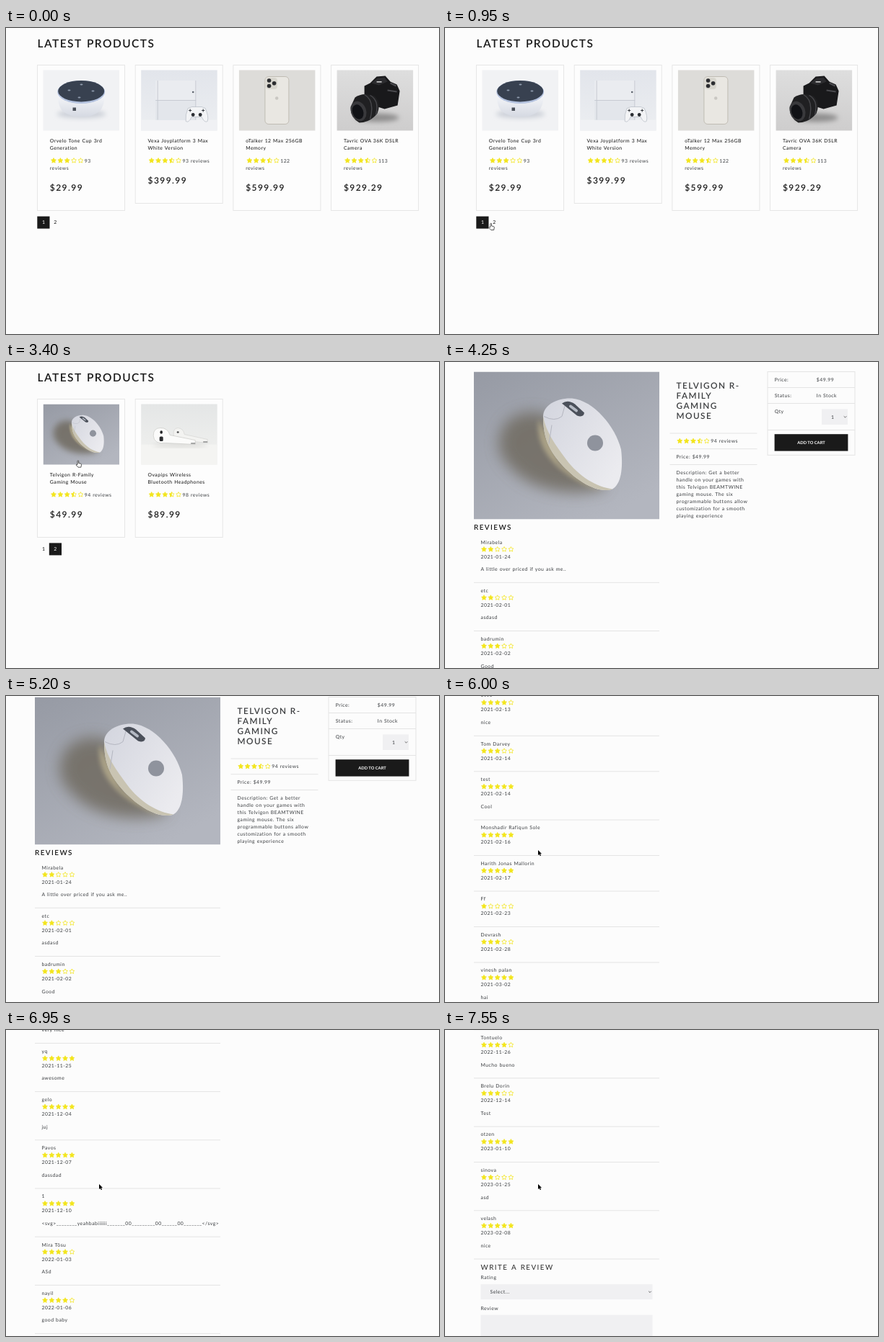
Recreate the animation shown at these times as an HTML page. Size 600 px wide and 425 px high, loop 8 s.

```html
<!DOCTYPE html>
<html lang="en">
<head>
<meta charset="utf-8">
<title>Latest products</title>
<style>
html, body { margin: 0; width: 100%; height: 100%; overflow: hidden; background: #fcfcfc; }
svg { display: block; width: 100vw; height: 100vh; }
text { font-family: Lato, "Open Sans", sans-serif; text-rendering: geometricPrecision; }
.body { font-size: 6.85px; letter-spacing: .476px; word-spacing: .35px; fill: #3a3d40; }
.link { fill: #111; }
.title { font-size: 15.5px; font-weight: 600; letter-spacing: 1.45px; word-spacing: 1.5px; fill: #1a1a1a; }
.price { font-size: 12px; font-weight: 600; letter-spacing: 1.43px; fill: #1a1a1a; }
.name { font-size: 11.8px; font-weight: 600; letter-spacing: 1.43px; fill: #3c3e40; }
.head { font-size: 9.9px; letter-spacing: 1.43px; word-spacing: 1px; fill: #2a2a2a; }
.strong { font-weight: 600; fill: #1a1a1a; }
.button { font-size: 5.8px; font-weight: 700; fill: #fff; text-anchor: middle; }
.pager { letter-spacing: 0; text-anchor: middle; }
.white { fill: #fff; }
.rule { stroke: #e4e4e4; fill: none; }
.chevron { fill: none; stroke: #444; stroke-width: .8; }
</style>
</head>
<body>
<svg id="stage" viewBox="0 0 600 425" preserveAspectRatio="none"></svg>
<script>
const LOOP = 8000, STEP = 50;

const esc = s => s.replace(/&/g, '&amp;').replace(/</g, '&lt;').replace(/>/g, '&gt;');
const text = (x, y, s, cls = 'body') => `<text x="${x}" y="${y}" class="${cls}">${esc(s)}</text>`;
const lines = (x, y, gap, list, cls) => list.map((s, i) => text(x, y + i * gap, s, cls)).join('');
const rect = (x, y, w, h, fill, more = '') => `<rect x="${x}" y="${y}" width="${w}" height="${h}" fill="${fill}" ${more}/>`;
const oval = (x, y, rx, ry, fill, more = '') => `<ellipse cx="${x}" cy="${y}" rx="${rx}" ry="${ry}" fill="${fill}" ${more}/>`;
const path = (d, fill, more = '') => `<path d="${d}" fill="${fill}" ${more}/>`;
const rule = (x1, x2, y) => `<path class="rule" d="M${x1} ${y}H${x2}"/>`;
const chevron = (x, y) => `<path class="chevron" d="M${x - 1.8} ${y - .9}l1.8 1.8l1.8 -1.8"/>`;
const group = (id, s) => `<g id="${id}">${s}</g>`;

// Stars
const starShape = r => 'M' + Array.from({ length: 10 }, (_, i) => {
  const a = (i / 5 - .5) * Math.PI, k = i % 2 ? r * .5 : r;
  return `${(k * Math.cos(a)).toFixed(2)} ${(k * Math.sin(a)).toFixed(2)}`;
}).join('L') + 'Z';

function stars(x, y, rating) {
  return Array.from({ length: 5 }, (_, i) => {
    const kind = rating >= i + 1 ? 'full' : rating > i ? 'half' : 'empty';
    return `<use href="#${kind}" x="${(x + i * 9.35).toFixed(2)}" y="${y}"/>`;
  }).join('');
}

const gradient = (id, a, b, dir = 'x2="0" y2="1"') =>
  `<linearGradient id="${id}" x1="0" y1="0" ${dir}><stop stop-color="${a}"/><stop offset="1" stop-color="${b}"/></linearGradient>`;

const defs = `<defs>
  <g id="empty">${path(starShape(3.6), 'none', 'stroke="#f3e51c" stroke-width=".8" stroke-linejoin="round"')}</g>
  <g id="full">${path(starShape(3.7), '#f3e51c', 'stroke="#f3e51c" stroke-width=".7" stroke-linejoin="round"')}</g>
  <clipPath id="left"><rect x="-5" y="-5" width="5" height="10"/></clipPath>
  <g id="half"><use href="#empty"/><g clip-path="url(#left)"><use href="#full"/></g></g>
  <clipPath id="photo"><rect width="257" height="205"/></clipPath>
  <filter id="soft" x="-40%" y="-40%" width="180%" height="180%"><feGaussianBlur stdDeviation="10"/></filter>
  <filter id="haze" x="-40%" y="-40%" width="180%" height="180%"><feGaussianBlur stdDeviation="3"/></filter>
  ${gradient('desk', '#969aa4', '#b3b6bf', 'x2=".7" y2="1"')}
  ${gradient('shell', '#d3d5de', '#ebebef', 'x2="1" y2=".7"')}
  ${gradient('grey', '#dedede', '#cecdcd')}
  ${gradient('pale', '#e4e6e6', '#f2f2f0')}
  ${gradient('steel', '#e2e5eb', '#eceef1')}
  ${gradient('pearl', '#fafbfd', '#d5d9e2')}
</defs>`;

// Photos: the mouse is 257 x 205, the others 105.5 x 84
const mouse = `<g clip-path="url(#photo)">
  ${rect(0, 0, 257, 205, 'url(#desk)')}
  ${path('M35 95C38 58 80 48 105 62L185 160C150 174 95 168 65 146C45 130 32 115 35 95Z', '#6f6b60', 'filter="url(#soft)" opacity=".85"')}
  ${path('M90 66C84 105 112 142 175 166L120 127Z', '#b8ae8e', 'filter="url(#haze)" opacity=".8"')}
  ${path('M96 62C96 46 116 36 136 37C166 40 196 76 204 108C207 134 204 156 192 163C172 170 142 152 120 127C104 108 96 92 96 62Z', 'url(#shell)')}
  ${path('M96 62C96 92 104 108 120 127C142 152 172 170 192 163C170 160 146 146 128 122C112 100 100 84 96 62Z', '#c9c4b2')}
  ${path('M97 62Q112 70 122 62L127 44M108 74l-4 26', 'none', 'stroke="#b4b6c0" stroke-width="1"')}
  ${path('M122 44Q130 38 140 45L153 57Q152 64 143 61Z', '#4b505a')}
  ${path('M134 48l8 6', 'none', 'stroke="#b5bac4" stroke-width="4" stroke-linecap="round"')}
  <circle cx="168" cy="99" r="11" fill="#8f939d"/></g>`;

const speaker = rect(0, 0, 105.5, 84, '#f1f2f4')
  + oval(53, 61, 34, 6, '#cdd1d9', 'filter="url(#haze)"')
  + path('M20 30Q20 50 27 57Q37 65 53 65Q69 65 78 57Q85.5 50 85.5 30Z', 'url(#pearl)')
  + oval(52.7, 30.4, 33, 16, '#b5c3df')
  + oval(52.7, 29.2, 32, 14.8, '#384150')
  + [[53, 20], [36, 28], [69, 29], [50, 38]].map(([x, y]) => oval(x, y, 2, 1, '#8f9bad')).join('')
  + rect(41, 52, 4.5, 4.5, '#4a4f58');

const consoleBox = rect(0, 0, 105.5, 84, 'url(#steel)')
  + rect(0, 69, 105.5, 15, '#f0f1f4')
  + rect(20, 14.5, 56, 55, '#e3e6eb') + rect(20, 14.5, 56, 27, '#eaecf0')
  + path('M20 42H76M23 14.5V69M75.6 14.5V69', 'none', 'stroke="#c0c5cd" stroke-width=".8"')
  + oval(72, 30.5, 1.3, 1.3, '#5b626b')
  + path('M65 53Q70 50 77 51Q85 50 89 53Q94 64 92 71Q88 74 84 65H70Q66 74 62 71Q61 62 65 53Z', '#f3f4f6', 'stroke="#a9b0ba" stroke-width=".6"')
  + oval(72, 62, 2.4, 2.4, '#2b2e33') + oval(82, 62, 2.4, 2.4, '#2b2e33')
  + path('M68 54v4M66 56h4M86 54v4M84 56h4', 'none', 'stroke="#33373d" stroke-width="1"');

const phone = rect(0, 0, 105.5, 84, '#dddcd9')
  + rect(36, 9, 33, 66, '#e9e7e2', 'rx="5" stroke="#bdb8af" stroke-width=".9"')
  + rect(37.5, 10.5, 15.5, 16, '#d8d6ce', 'rx="4"')
  + [[41.7, 14.5], [41.7, 22], [48.7, 18.2]].map(([x, y]) => oval(x, y, 2.8, 2.8, '#2c2d30')).join('')
  + oval(52.3, 39, 2.2, 2.2, '#c9c7c2');

const camera = rect(0, 0, 105.5, 84, 'url(#grey)')
  + oval(56, 66, 30, 6, '#8f8e8e', 'filter="url(#haze)"')
  + path('M38 22L46 18L55 9L67 8L74 16L83 20L87 29L84 49L66 54L38 45Z', '#19191b')
  + path('M48 18L56 11L66 10L70 16L58 21Z', '#2c2c2f')
  + rect(55, 15.5, 7, 1.6, '#c8c8c8')
  + path('M74 18l8 4M70 28l13 2', 'none', 'stroke="#4b4b4f" stroke-width="2"')
  + path('M25 38Q36 30 52 36Q62 45 56 60Q46 73 31 73Q18 66 19 51Z', '#202022')
  + path('M46 35Q59 42 54 62M38 34Q53 42 46 68', 'none', 'stroke="#47474b" stroke-width="1.4"')
  + oval(30, 57, 10.5, 14, '#39393c', 'transform="rotate(-20 30 57)"')
  + oval(29, 58, 7.5, 10.5, '#111216', 'transform="rotate(-20 29 58)"');

const buds = rect(0, 0, 105.5, 84, 'url(#pale)')
  + rect(0, 56, 105.5, 28, '#f4f4f2')
  + oval(54, 57, 38, 2, '#cfcfcc', 'filter="url(#haze)"')
  + path('M45 42Q44 34 51 33Q59 34 60 42L92 49V54L46 49Z', '#f3f3f1', 'stroke="#c9c9c6" stroke-width=".5"')
  + path('M17 44Q17 33 27 33Q37 33 40 43L75 50V56L34 54Q18 56 17 44Z', '#fbfbfa', 'stroke="#c3c3c0" stroke-width=".6"')
  + oval(28, 39, 1.8, 2.3, '#232426') + rect(25.5, 45, 5, 6.5, '#2c2d30', 'rx="1.6"')
  + oval(51, 39, 1.5, 1.3, '#4a4a4c')
  + path('M69 54.5H75M86 52.5H92', 'none', 'stroke="#8b8c8c" stroke-width="1.6"');

function card(x, photo, name, rating, count, price, wrap) {
  const drop = wrap ? 10 : 0;
  return rect(x, 51.5, 121, 192 + drop, '#fdfdfd', 'stroke="#e6e6e6"')
    + `<g transform="translate(${x + 8} 58.5)">${photo}</g>`
    + lines(x + 17.3, 159.2, 10.2, name, 'body link')
    + stars(x + 22.5, 184.2, rating)
    + text(x + 65.3, 186.8, wrap ? `${count}` : `${count} reviews`)
    + (wrap ? text(x + 17.3, 196.9, 'reviews') : '')
    + text(x + 17.3, 215.8 + drop, price, 'price');
}

const pager = (y, active) => rect(active === 1 ? 43.3 : 59.8, y, 17.2, 17, '#1a1a1a')
  + [1, 2].map(n => text(n === 1 ? 52 : 68.3, y + 10.8, `${n}`, `body pager ${n === active ? 'white' : 'link'}`)).join('');

const smallMouse = `<g transform="scale(.4105)">${mouse}</g>`;
const page1 = card(43.5, speaker, ['Orvelo Tone Cup 3rd', 'Generation'], 3, 93, '$29.99', true)
  + card(179.2, consoleBox, ['Vexa Joyplatform 3 Max', 'White Version'], 3.5, 93, '$399.99', false)
  + card(314.9, phone, ['oTalker 12 Max 256GB', 'Memory'], 3.5, 122, '$599.99', true)
  + card(450.6, camera, ['Tavric OVA 36K DSLR', 'Camera'], 3.5, 113, '$929.29', true)
  + pager(261.6, 1);
const page2 = card(43.5, smallMouse, ['Telvigon R-Family', 'Gaming Mouse'], 3.5, 94, '$49.99', false)
  + card(179.2, buds, ['Ovapips Wireless', 'Bluetooth Headphones'], 3.5, 98, '$89.99', false)
  + pager(251.4, 2);

// Reviews
let seed = 11;
const random = () => (seed = seed * 16807 % 2147483647) / 2147483647;
const pick = list => list[Math.floor(random() * list.length)];
function fill(n, from, to) {
  const a = Date.parse(from), b = Date.parse(to);
  return Array.from({ length: n }, (_, i) => [
    pick(['mel', 'Tor', 'va', 'Jun', 'lo']) + pick(['rano', 'vik', 'du', 'shel', 'bin']),
    Math.ceil(random() * 3) + 2,
    new Date(a + (b - a) * i / (n - 1)).toISOString().slice(0, 10),
    random() < .7 ? pick(['good', 'nice', 'ok', 'Great mouse', 'test', 'Love it']) : ''
  ]);
}

const reviews = [
  ['Mirabela', 2, '2021-01-24', 'A little over priced if you ask me..'],
  ['etc', 2, '2021-02-01', 'asdasd'],
  ['badrumin', 3, '2021-02-02', 'Good'],
  ...fill(6, '2021-02-03', '2021-02-12'),
  ['ovve', 4, '2021-02-13', 'nice'],
  ['Tom Darvey', 3, '2021-02-14', ''],
  ['test', 5, '2021-02-14', 'Cool'],
  ['Monshadir Rafiqun Sole', 5, '2021-02-16', ''],
  ['Harith Jonas Mallorin', 5, '2021-02-17', ''],
  ['Ff', 1, '2021-02-23', ''],
  ['Devrash', 3, '2021-02-28', ''],
  ['vinesh palan', 5, '2021-03-02', 'hai'],
  ...fill(18, '2021-03-09', '2021-11-14'),
  ['lorin', 5, '2021-11-20', 'very nice'],
  ['yq', 5, '2021-11-25', 'awesome'],
  ['gelo', 5, '2021-12-04', 'juj'],
  ['Pavos', 5, '2021-12-07', 'dassdad'],
  ['1', 5, '2021-12-10', '<svg>________yeahbabiiiiii_______00_________00______00_______</svg>'],
  ['Mira Tösu', 4, '2022-01-03', 'ASd'],
  ['nayil', 4, '2022-01-06', 'good baby'],
  ...fill(8, '2022-01-19', '2022-11-08'),
  ['Tontuelo', 4, '2022-11-26', 'Mucho bueno'],
  ['Brelu Dorin', 3, '2022-12-14', 'Test'],
  ['otzen', 5, '2023-01-10', ''],
  ['sinova', 2, '2023-01-25', 'asd'],
  ['velash', 5, '2023-02-08', 'nice']
];

const rowY = {};
let end = 238;
const reviewList = reviews.map(([who, rating, date, note]) => {
  const y = end;
  rowY[who] = y;
  end += note ? 67.2 : 49.5;
  return text(49.5, y + 2.5, who) + stars(54, y + 10.2, rating) + text(49.5, y + 22.5, date)
    + (note ? text(49.5, y + 40.2, note) : '') + rule(40, 297, end - 10.9);
}).join('');

const form = `<g transform="translate(0 ${end - 328.7})">`
  + text(49.5, 332.7, 'WRITE A REVIEW', 'head') + text(49.5, 346, 'Rating')
  + rect(49.5, 353, 238, 21, '#f0f0f2') + text(62.5, 365.8, 'Select...') + chevron(284, 363.5)
  + text(49.5, 389, 'Review') + rect(49.5, 395.5, 238, 60, '#f0f0f2') + '</g>';

const product = `<g transform="translate(40 1.5)">${mouse}</g>`
  + lines(320.5, 25.4, 13.7, ['TELVIGON R-', 'FAMILY', 'GAMING', 'MOUSE'], 'name')
  + [87, 108.7, 130.5].map(y => rule(311.5, 432.5, y)).join('')
  + stars(325.3, 97.8, 3.5) + text(368.2, 100.2, '94 reviews')
  + text(320.5, 122.2, 'Price: $49.99')
  + lines(320.5, 144, 10, ['Description: Get a better', 'handle on your games with',
    'this Telvigon BEAMTWINE', 'gaming mouse. The six', 'programmable buttons allow',
    'customization for a smooth', 'playing experience'])
  + rect(447, 1.5, 121, 115.8, 'none', 'class="rule"')
  + [23.5, 45.5, 82.5].map(y => rule(447, 568, y)).join('')
  + text(456.7, 15.2, 'Price:') + text(514.8, 15.2, '$49.99')
  + text(456.7, 36.9, 'Status:') + text(514.8, 36.9, 'In Stock')
  + text(456.7, 58.8, 'Qty') + rect(522, 53.5, 36, 21.5, '#f0f0f2') + text(535, 66.6, '1') + chevron(554.5, 64.2)
  + rect(456.6, 88.2, 101.8, 23.4, '#1a1a1a') + text(507.5, 102, 'ADD TO CART', 'button')
  + text(40, 221.2, 'REVIEWS', 'head strong') + reviewList + form;

const loader = `<path d="M16.26 16.26A23 23 0 1 1 16.26 -16.26" fill="none" stroke="#3a3a3a" stroke-width="1.7"/>`;
const arrow = path('M0 0V7.2L1.7 5.7L2.8 8.2L4 7.7L2.9 5.3H5.1Z', '#000', 'stroke="#fff" stroke-width=".8" paint-order="stroke"');
const hand = path('M-.8 5.6V1a.8.8 0 0 1 1.6 0V3.8l2.9 .7q1 .3 .9 1.3l-.6 3.6H0L-2.9 6.2q.5 -1.1 2.1 -.6Z', '#fff', 'stroke="#222" stroke-width=".75" stroke-linejoin="round"');

document.getElementById('stage').innerHTML = defs
  + group('title', text(43.5, 27.4, 'LATEST PRODUCTS', 'title'))
  + group('page1', page1) + group('page2', page2) + group('product', product)
  + group('loader', loader) + group('arrow', arrow) + group('hand', hand);

const part = {};
for (const id of ['title', 'page1', 'page2', 'product', 'loader', 'arrow', 'hand']) part[id] = document.getElementById(id);
const show = (id, on) => { part[id].style.display = on ? '' : 'none'; };
const place = (id, x, y, turn = 0) => part[id].setAttribute('transform', `translate(${x.toFixed(2)} ${y.toFixed(2)}) rotate(${turn})`);

// Smooth curve through [time, value] keys, at rest at both ends
function track(keys) {
  const last = keys.length - 1;
  const slope = i => i === 0 || i === last ? 0
    : (keys[i + 1][1] - keys[i - 1][1]) / (keys[i + 1][0] - keys[i - 1][0]);
  return t => {
    if (t <= keys[0][0]) return keys[0][1];
    if (t >= keys[last][0]) return keys[last][1];
    const i = keys.findIndex(k => k[0] > t) - 1;
    const [t0, a] = keys[i], [t1, b] = keys[i + 1], d = t1 - t0, u = (t - t0) / d;
    return a + (b - a) * u * u * (3 - 2 * u)
      + d * u * (1 - u) * (slope(i) * (1 - u) - slope(i + 1) * u);
  };
}

const pointerX = track([[50, 526], [250, 490], [450, 370], [800, 68], [1000, 69], [2600, 69], [2900, 225], [3000, 235], [3400, 99.9]]);
const pointerY = track([[50, 61], [250, 270], [450, 405], [800, 285], [1000, 271], [2600, 271], [2900, 130], [3050, 78], [3400, 136.8]]);
const nudge = track([[4850, -12], [5050, 0]]);
const roll = track([
  [5250, 0],
  [6000, rowY.ovve + 1],
  [6950, rowY.yq - 29.3],
  [7550, rowY.Tontuelo - 10.6]
]);

function draw(t) {
  const home = t < 3500, opened = t >= 3950;
  const waiting = t >= 1250 && t < 2150 || !home && !opened;
  show('title', home);
  show('page1', t < 1250);
  show('page2', t >= 2150 && home);
  show('product', opened);
  show('loader', waiting);
  place('loader', 307.7, home ? 67 : 37, (16 + (t - 1700) * .48) % 360);
  place('product', 0, -nudge(t) - roll(t));

  const scrolling = t >= 5300;
  const x = scrolling ? 129 : pointerX(t), y = scrolling ? 214 : pointerY(t);
  const visible = scrolling || t >= 50 && !opened;
  const overLink = t >= 850 && t < 1250 || t >= 2600 && home && y < 143;
  show('arrow', visible && !overLink);
  show('hand', visible && overLink);
  place('arrow', x, y);
  place('hand', x, y);
}

const start = performance.now();
function tick() {
  const t = (performance.now() - start) % LOOP;
  draw(Math.floor(t / STEP) * STEP);
  requestAnimationFrame(tick);
}
tick();
</script>
</body>
</html>
```
